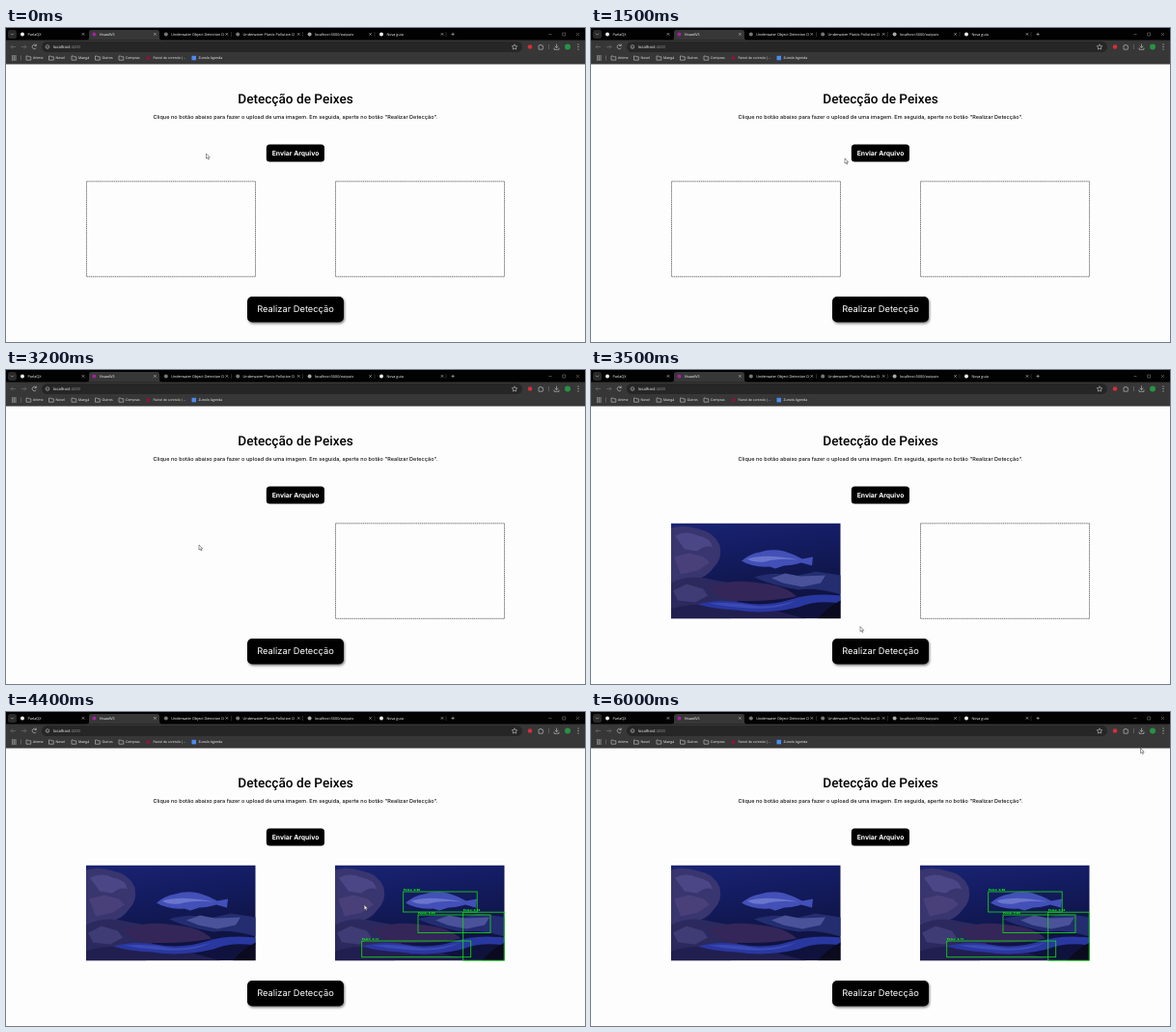
An HTML page that plays this animation: 600x325 px, repeating every 6.1 s.

```html
<!DOCTYPE html>
<html lang="pt">
<head>
<meta charset="utf-8">
<title>Detecção de Peixes</title>
<style>
  html, body { margin: 0; width: 100%; height: 100%; overflow: hidden; background: #fdfdfd; }
  svg { display: block; width: 100vw; height: 100vh; }
  text { text-rendering: geometricPrecision; }
  .ui { font: 500 3.75px "Open Sans", sans-serif; fill: #fff; }
  .page { font-family: Inter, sans-serif; text-anchor: middle; }
  .line { fill: none; stroke: #c8c8c8; stroke-width: .6; }
  .dim { stroke: #777; }
  .faint { stroke: #444; }
  .frame { fill: none; stroke: #555; stroke-width: .8; stroke-dasharray: 1.3 .6; }
  .boxes rect { fill: none; stroke: #16d816; stroke-width: .85; }
  .boxes text { font: bold 2.8px "DejaVu Sans", sans-serif; fill: #1f1; }
</style>
</head>
<body>
<svg viewBox="0 0 600 325">
  <defs>
    <linearGradient id="water" x2=".3" y2="1">
      <stop offset="0" stop-color="#1a2474"/>
      <stop offset=".4" stop-color="#131c60"/>
      <stop offset="1" stop-color="#0e123c"/>
    </linearGradient>
    <filter id="shadow" x="-20%" y="-20%" width="140%" height="160%">
      <feDropShadow dx="1" dy="1.5" stdDeviation="1.1" flood-opacity=".5"/>
    </filter>
    <clipPath id="crop"><rect width="175.500" height="98.800"/></clipPath>
    <g id="scene" clip-path="url(#crop)">
      <rect width="176" height="99" fill="url(#water)"/>
      <path d="M0 5Q14 1 28 6Q44 9 50 22Q54 36 44 46Q37 57 22 59L0 66Z" fill="#38356f"/>
      <path d="M4 13Q16 7 28 13Q41 15 43 25Q36 22 27 29L14 27Z" fill="#4b4787"/>
      <path d="M3 35L19 31L34 35L40 41L28 49L10 53Z" fill="#494079"/>
      <path d="M0 62Q20 52 45 59L75 64L62 99H0Z" fill="#2b295d"/>
      <path d="M2 70L16 63L33 68L38 75L25 82L7 80Z" fill="#3f3b74"/>
      <path d="M40 66Q65 57 92 62Q118 64 130 76Q98 82 64 80Q46 77 40 66Z" fill="#352659"/>
      <path d="M86 56Q108 49 128 55L150 50L176 54V74Q150 66 132 69Q106 65 86 56Z" fill="#232d70"/>
      <path d="M104 57L118 52L134 55L160 54L155 62L136 66L116 62Z" fill="#4a5299"/>
      <path d="M0 89Q24 81 45 87L110 91L140 99H0Z" fill="#211f4f"/>
      <path d="M28 84Q48 78 72 82Q98 87 124 79Q145 72 176 75V83Q151 79 132 87Q98 95 68 90Q44 89 28 84Z" fill="#2937a0"/>
      <path d="M40 83Q65 81 90 86Q112 86 130 80Q112 90 82 88Q58 87 40 83Z" fill="#3c4ab6"/>
      <path d="M152 99Q162 87 176 80V99Z" fill="#0b0a1e"/>
      <path d="M73 39Q81 32 92 30Q104 26 117 29Q127 32 136 37L147 35L146 44L135 41Q125 44 117 44L108 47L102 45Q84 46 73 39Z" fill="#4350b8"/>
      <path d="M79 37Q98 31 132 38Q110 36 97 40Q85 41 79 37Z" fill="#6a76cc"/>
    </g>
  </defs>

  <rect width="600" height="325" fill="#fdfdfd"/>
  <g id="browser">
    <rect width="600" height="37.500" fill="#373737"/>
    <rect width="600" height="12.500" fill="#020202"/>
    <path d="M83 12.500Q86 12.500 86 10V4.500Q86 2 88.500 2H156.500Q159 2 159 4.500V10Q159 12.500 162 12.500Z" fill="#373737"/>
    <rect x="2" y="2" width="9" height="9" rx="2.500" fill="#292929"/>
    <rect x="37" y="14" width="498" height="11" rx="5.500" fill="#262626"/>
    <path class="line" d="M5 5.700L6.500 7.200L8 5.700M461.500 6.400h3.200M463.100 4.800v3.200
      M31 18a2.200 2.200 0 1 0 .3 2.500M31.300 16.500v2h-2
      M527 16.800l.8 1.800l2 .2l-1.500 1.300l.4 2l-1.700-1l-1.700 1l.4-2l-1.500-1.300l2-.2z
      M552 18h1.300q.7-2 1.400 0h1.500v1.500q1.800.7 0 1.400v1.300h-4.200z
      M570.500 16.500v4m-1.800-1.800l1.800 1.800l1.800-1.800M568 20.500v1.800h5v-1.800"/>
    <path class="line dim" d="M10 19.500H5m2-2l-2 2l2 2M16 19.500h5m-2-2l2 2l-2 2M562.500 17v5M15.500 28.500v5
      M562.500 6.500h3M576.700 5h3v3h-3zM591 5l3 3M594 5l-3 3"/>
    <path class="line faint" d="M233.500 4v5M307.500 4v5M382 4v5M456 4v5"/>
    <circle class="line" cx="43" cy="19.500" r="1.800"/>
    <path class="line" d="M43 19.300v1.200"/>
    <circle cx="543" cy="19.500" r="2.300" fill="#d32f3c"/>
    <circle cx="582" cy="19.500" r="3" fill="#279344"/>
    <path d="M593 17v.1M593 19.500v.1M593 22v.1" stroke="#ddd" stroke-linecap="round"/>
    <path d="M6 29h4.600M6 31h4.600M6 33h4.600" stroke="#ccc" stroke-width="1.200" stroke-dasharray="1.200 .5"/>
    <text class="ui" x="49" y="21" style="font-size:4.150px">localhost<tspan fill="#999">:4200</tspan></text>
  </g>

  <g class="page">
    <text x="300" y="78" style="font:500 13.600px Roboto,sans-serif">Detecção de Peixes</text>
    <text x="300" y="93.800" font-size="5.500" font-weight="500" letter-spacing=".05" fill="#111">Clique no botão abaixo para fazer o upload de uma imagem. Em seguida, aperte no botão "Realizar Detecção".</text>
    <rect x="269.800" y="120.500" width="60.200" height="18" rx="3.500"/>
    <text x="300" y="131.900" font-size="6.800" font-weight="700" fill="#fff">Enviar Arquivo</text>
    <g id="detect">
      <rect x="250" y="278" width="100" height="26.500" rx="5" filter="url(#shadow)"/>
      <text x="300" y="294.300" font-size="9.300" fill="#fff">Realizar Detecção</text>
    </g>
  </g>

  <rect id="leftFrame" class="frame" x="83.500" y="158.800" width="175" height="98.500"/>
  <rect id="rightFrame" class="frame" x="341.500" y="158.800" width="175" height="98.500"/>
  <use id="photo" href="#scene" x="83" y="158.500"/>
  <g id="result">
    <use href="#scene" x="341" y="158.500"/>
    <g id="boxes" class="boxes"></g>
  </g>

  <g id="cursor" stroke="#333" stroke-width=".5" stroke-linejoin="round" fill="#fff">
    <path id="arrow" d="M0 0V5.200L1.200 4.100L2 6L3 5.600L2.100 3.800H3.700Z"/>
    <path id="hand" d="M-.5 .3Q.2-.5.8.3V2.500L3 3Q3.700 3.300 3.500 4.500L2.800 7H-.3L-2 4.700Q-2 3.300-.5 4Z"/>
  </g>
</svg>

<script>
const $ = id => document.getElementById(id);
const add = (id, markup) => $(id).insertAdjacentHTML('beforeend', markup);
const label = (x, y, text, size) =>
  `<text class="ui" x="${x}" y="${y}" style="font-size:${size}px">${text}</text>`;
const dot = (x, y, color) => `<circle cx="${x}" cy="${y}" r="2" fill="${color}"/>`;

[['ParlaQX', '#eee'], ['VisaoAVS', '#a3239c'], ['Underwater Object Detection D', '#777'],
 ['Underwater Plastic Pollution D', '#777'], ['localhost:5000/outputs', '#aaa'], ['Nova guia', '#eee']
].forEach(([title, color], i) => {
  const x = 17 + i * 74.4;
  add('browser', dot(x, 6.4, color) + label(x + 5.4, 7.8, title, 3.75) +
    `<path class="line" d="M${x + 61.8} 5.2l2.400 2.400m0-2.400l-2.400 2.400"/>`);
});

[[28, 'Anime'], [51.5, 'Novel'], [75, 'Mangá'], [99.5, 'Outros'], [124, 'Compras']].forEach(([x, name]) =>
  add('browser', label(x, 32.4, name, 3.5) +
    `<path class="line" d="M${x - 7} 29h1.800l.7.800h2.300v3.400h-4.800z"/>`));
add('browser', dot(147.5, 31, '#8d1538') + label(152.5, 32.4, 'Painel de controle |...', 3.4) +
  '<rect x="192.500" y="28.800" width="4.500" height="4.500" fill="#4b8bf0"/>' +
  label(199.5, 32.4, 'Zunolo Agenda', 3.5));

[[411.7, 186, 76.5, 21, '0.86'], [427, 210, 75, 18.5, '0.80'],
 [473.7, 207.2, 42.5, 50, '0.74'], [368.7, 237, 113, 16.7, '0.71']
].forEach(([x, y, w, h, score]) => add('boxes',
  `<rect x="${x}" y="${y}" width="${w}" height="${h}"/><text x="${x}" y="${y - .8}">Peixe: ${score}</text>`));

const LOOP = 6100, STEP = 100;
// Pointer path: time in ms, x, y
const path = [
  [0, 207.5, 130], [700, 225, 131], [1500, 263, 135], [1800, 286, 129], [2000, 286, 129],
  [2200, 92, 61], [2400, 95, 66], [2800, 147, 136], [3000, 152.5, 139.5], [3100, 152.5, 139.5],
  [3200, 200, 181], [3500, 279, 265.5], [3700, 290.5, 281.5], [4100, 290.5, 281.5],
  [4600, 425, 145], [4800, 439, 135.5], [5300, 450, 128], [6000, 569.5, 37.5], [LOOP, 569.5, 37.5]
];

function pointer(t) {
  const i = path.findIndex(p => p[0] > t);
  const [t0, x0, y0] = path[i - 1], [t1, x1, y1] = path[i];
  const k = (t - t0) / (t1 - t0);
  return [x0 + (x1 - x0) * k, y0 + (y1 - y0) * k];
}

const show = (id, on) => $(id).setAttribute('display', on ? 'inline' : 'none');
const inside = (x, y, left, top, right, bottom) => x > left && x < right && y > top && y < bottom;

function draw(now) {
  const t = Math.floor(now % LOOP / STEP) * STEP;
  const [x, y] = pointer(t);
  const onDetect = inside(x, y, 250, 278, 350, 304);
  const onButton = onDetect || inside(x, y, 270, 121, 330, 138);
  $('cursor').setAttribute('transform', `translate(${x} ${y})`);
  $('detect').setAttribute('transform', onDetect ? 'translate(300 291) scale(1.012) translate(-300 -291)' : '');
  show('arrow', !onButton);
  show('hand', onButton);
  show('leftFrame', t < 3200);
  show('photo', t >= 3300);
  show('rightFrame', t < 4300);
  show('result', t >= 4300);
  requestAnimationFrame(draw);
}
requestAnimationFrame(draw);
</script>
</body>
</html>
```
